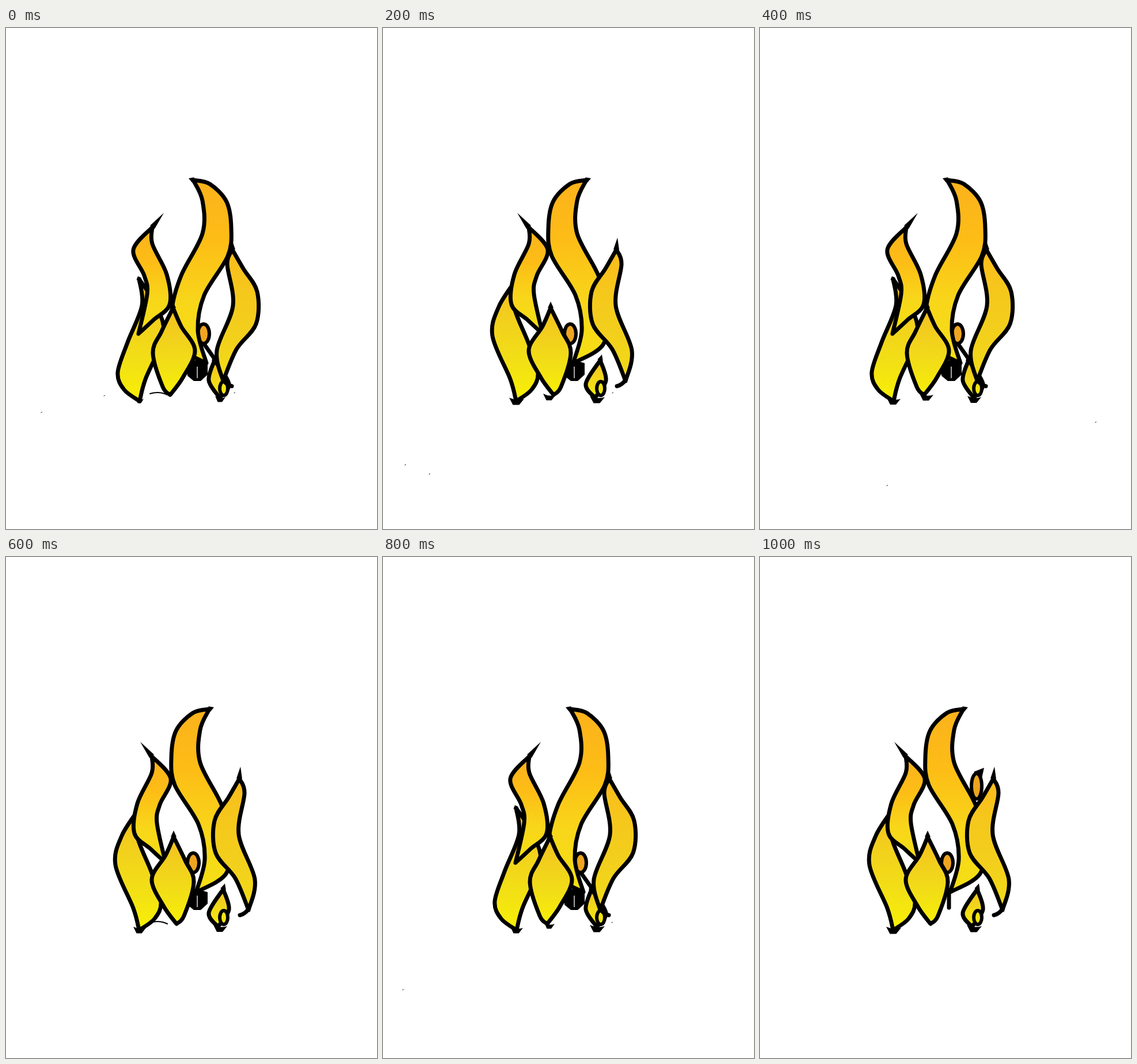
An HTML page for the animation above (1200 ms loop, 644 px wide and 870 px high).

```html
<!DOCTYPE html>
<html lang="en">
<head>
<meta charset="utf-8">
<title>Fire</title>
<style>
  html, body { margin: 0; width: 100%; height: 100%; overflow: hidden; background: #fff; }
  svg { display: block; width: 100%; height: 100%; }
</style>
</head>
<body>
<svg id="stage" viewBox="0 0 644 870"></svg>
<script>
const STEP = 200, COUNT = 6;
const stage = document.getElementById('stage');

// Each flame: its two edges from top to foot, the sharp tip above them,
// and the axis about which it flips from one pose to the other
const flames = {
  low: {
    paint: 'lemon', axis: 231.5, tip: '229,431',
    left: '231,436 236,482 211,546 194,598 205,628 232,648',
    right: '231,436 262,484 273,535 242,610 232,648'
  },
  small: {
    paint: 'warm', axis: 253.5, tip: '274,321',
    left: '254,346 221,385 240,430 245,462 230,531',
    right: '254,346 254,375 279,428 284,480 256,507 230,531'
  },
  tall: {
    paint: 'warm', axis: 339, tip: '317,261',
    left: '325,264 341,300 341,357 304,430 288,490 296,550 348,582',
    right: '325,264 354,271 383,302 391,348 385,396 344,464 333,525 348,582'
  },
  mid: {
    paint: 'lemon', axis: 290.5, tip: '290,475',
    left: '290,486 270,527 255,564 272,623 285,637',
    right: '290,486 304,518 328,560 307,607 285,637'
  },
  side: {
    paint: 'gold', axis: 399, tip: '391,364', tail: 'M377 611Q383 620 392 622',
    left: '393,385 384,410 394,482 366,560 377,613',
    right: '393,385 412,418 436,458 434,514 400,558 377,613'
  },
  drop: {
    paint: 'lemon', axis: 369.5, tip: '359,567',
    left: '362,577 352,612 371,642',
    right: '362,577 387,618 371,642'
  }
};

const paints = {
  warm: ['#fbb21c', '#fdbd16', '#f8d61a', '#f5df14'],
  gold: ['#fbbb1c', '#f5c81c', '#f2d01c', '#f3dc17'],
  lemon: ['#f4bf1e', '#f2d01d', '#f2df16', '#f8f005']
};

function add(parent, name, attrs) {
  const el = document.createElementNS('http://www.w3.org/2000/svg', name);
  for (const key in attrs) el.setAttribute(key, attrs[key]);
  return parent.appendChild(el);
}

for (const id in paints) {
  const gradient = add(stage, 'linearGradient', { id, x2: 0, y2: 1 });
  paints[id].forEach((color, i) => add(gradient, 'stop', { offset: i / 3, 'stop-color': color }));
}

const parse = text => text.split(' ').map(pair => pair.split(',').map(Number));
const ink = (g, d, fill = '#000') => add(g, 'path', { d, fill });
const line = (g, d, width = 7) => add(g, 'path', { d, fill: 'none', stroke: '#000',
  'stroke-width': width, 'stroke-linecap': 'round', 'stroke-linejoin': 'round' });
const oval = (g, cx, cy, rx, ry, fill) => add(g, 'ellipse', { cx, cy, rx, ry, fill,
  stroke: '#000', 'stroke-width': 6 });

// Smooth curve through the points, without the opening move
function curve(pts) {
  let d = '';
  for (let i = 0; i < pts.length - 1; i++) {
    const a = pts[i - 1] || pts[i], b = pts[i], c = pts[i + 1], e = pts[i + 2] || c;
    const h1 = b.map((v, k) => v + (c[k] - a[k]) / 6);
    const h2 = c.map((v, k) => v - (e[k] - b[k]) / 6);
    d += `C${h1} ${h2} ${c}`;
  }
  return d;
}

const flip = (g, axis) => add(g, 'g', { transform: `translate(${2 * axis} 0) scale(-1 1)` });

function flame(pose, name, flipped) {
  const f = flames[name];
  const g = flipped ? flip(pose, f.axis) : pose;
  const left = parse(f.left), right = parse(f.right);
  const outline = `M${left[0]}${curve(left)}${curve([...right].reverse())}Z`;
  ink(g, outline, `url(#${f.paint})`);
  line(g, outline);

  const [x, y] = left[0], [tip] = parse(f.tip);
  const dx = tip[0] - x, dy = tip[1] - y, k = 5 / Math.hypot(dx, dy);
  ink(g, `M${tip}L${x - dy * k} ${y + dx * k}L${x + dy * k} ${y - dx * k}Z`);
  if (f.tail) line(g, f.tail);
  if (name === 'drop') oval(pose, 378, 626, 7, 12, '#f3e40f');
}

function coals(g) {
  ink(g, 'M315 584L330 576 350 582 350 602 338 613 326 613 315 604Z');
  add(g, 'path', { d: 'M332 588V608', stroke: '#ddd', 'stroke-width': 1.5 });
}

// A group seen only during the given steps
function group(steps) {
  const g = add(stage, 'g', {});
  const keys = [];
  for (let i = 0; i <= COUNT; i++) {
    keys.push({ offset: i / COUNT, opacity: steps.includes(i % COUNT) ? 1 : 0, easing: 'step-end' });
  }
  g.animate(keys, { duration: STEP * COUNT, iterations: Infinity });
  return g;
}

coals(group([0, 1, 2, 3, 4]));

const last = group([5]);
line(last, 'M328 578V609');
oval(last, 376, 398, 9, 22, '#eda51f');
ink(last, 'M371 373L389 366 385 384Z');

const ember = g => oval(g, 343, 531, 10, 17, '#efa51f');

const even = group([0, 2, 4]);
ember(even);
line(even, 'M344 549L361 573');
['low', 'small', 'drop', 'side', 'tall', 'mid'].forEach(name => flame(even, name, false));

const odd = group([1, 3, 5]);
ember(flip(odd, 334));
['low', 'tall', 'small', 'mid', 'drop', 'side'].forEach(name => flame(odd, name, true));

// Ragged black feet: one size per foot in each step
const feet = [[232, 648], [289, 641], [372, 645]];
const sizes = [[7, 0, 9], [13, 11, 13], [12, 12, 12], [11, 0, 12], [11, 9, 13], [13, 0, 13]];
const specks = ['170,639 61,668 396,634', '38,759 80,775 398,634', '582,685 220,795', '', '34,752 397,635', ''];

sizes.forEach((row, i) => {
  const g = group([i]);
  row.forEach((s, k) => {
    const [x, y] = feet[k];
    if (s) ink(g, `M${x - s} ${y - 6}Q${x} ${y} ${x + s} ${y - 4}L${x + s / 3} ${y + s / 2}L${x - s / 2} ${y + s / 2}Z`);
  });
  if (specks[i]) parse(specks[i]).forEach(([x, y]) => line(g, `M${x} ${y}l1.5 -1`, 1));
});

line(group([0, 3]), 'M250 635Q266 630 280 637', 2);
</script>
</body>
</html>
```
